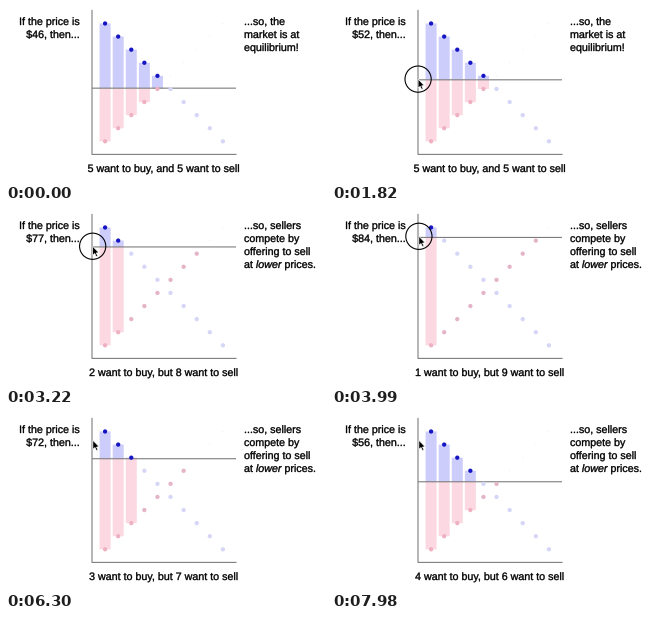
A matplotlib script that plays this animation: 320x176 px, repeating every 8 s.

```python
import matplotlib.pyplot as plt
import numpy as np
from matplotlib.animation import FuncAnimation
from matplotlib.patches import Circle, Polygon, Rectangle
from matplotlib.patheffects import Stroke

W, H, DPI = 320, 176, 100
PX = 72 / DPI                       # points per pixel
LOOP, TICK, STEP = 8000, 20, 70     # ms

plt.rcParams.update({
    "font.family": "Liberation Sans",
    "font.size": 10.7 * PX,
    "text.hinting": "none",
    "path.snap": False,
    "mathtext.fontset": "custom",
    "mathtext.rm": "Liberation Sans",
    "mathtext.it": "Liberation Sans:italic",
})

# Plot box: price 0 to 100 maps onto LEFT/BOTTOM plus SIZE pixels
LEFT, BOTTOM, SIZE, N = 86, 148.4, 144, 10
GAP = SIZE / (N + 1)
BAR = 11
rank = np.arange(1, N + 1)
xs = LEFT + GAP * rank
sell_value = 100 * rank / (N + 1)
buy_value = 100 - sell_value

BLUE, FAINT_BLUE, BLUE_BAR = "#1515c4", "#d6d6f6", "#cdcdfc"
PINK, LOOSE_PINK, PINK_BAR = "#efb0c2", "#e4b4c8", "#fbd8e2"
GHOST, LINE = "#ececec", "#7c7c7c"

BALANCED = ["...so, the", "market is at", "equilibrium!", ""]
SURPLUS = ["...so, sellers", "compete by", "offering to sell",
           r"at $\it{lower}$ prices."]
ARROW = np.array([(0, 0), (0, 9), (2.1, 7.2), (3.6, 10.4), (5, 9.7),
                  (3.6, 6.7), (6.3, 6.5)])


def price_y(price):
    return BOTTOM - SIZE * price / 100


def ease_out(t, start, end):
    u = np.clip((t - start) / (end - start), 0, 1)
    return 1 - (1 - u) ** 2


def drag_price(t):
    return np.interp(t, [1540, 2310, 3220, 3780], [47, 60.2, 77.4, 84.7])


def price_at(t):
    if t < 1400:
        return 46
    if t < 3990:
        return drag_price(t)
    if t < 5180:
        return 84
    # falls one dollar on two of every three steps
    turns, rest = divmod(t - 5180, 3 * STEP)
    return 83 - 2 * turns - (rest >= STEP)


def cursor_at(t):
    enter, rest, grab = np.array([(297, 120), (140, 97), (86, 81.7)])
    if t < 560:
        return enter + (rest - enter) * ease_out(t, STEP, 350)
    if t < 1610:
        return rest + (grab - rest) * ease_out(t, 490, 1190)
    y = price_y(drag_price(t)) - 0.7 if t < 3990 else 26.3
    return np.array([np.interp(t, [1610, 3780], [86, 86.9]), y])


fig = plt.figure(figsize=(W / DPI, H / DPI), dpi=DPI, facecolor="white")
ax = fig.add_axes([0, 0, 1, 1])
ax.set_xlim(0, W)
ax.set_ylim(H, 0)
ax.axis("off")


def bars(color):
    return [ax.add_patch(Rectangle((x - BAR / 2, 0), BAR, 0, color=color,
                                   lw=0, zorder=1)) for x in xs]


def dots(values):
    return ax.scatter(xs, price_y(values), s=(4.3 * PX) ** 2, lw=0, zorder=3)


def label(x, y, align):
    return ax.text(x, y, "", ha=align, va="baseline", color="black",
                   parse_math=align == "left",
                   path_effects=[Stroke(linewidth=0.35 * PX)])


buy_bars, sell_bars = bars(BLUE_BAR), bars(PINK_BAR)
sell_dots, buy_dots = dots(sell_value), dots(buy_value)
ax.plot([LEFT, LEFT, LEFT + SIZE], [BOTTOM - SIZE, BOTTOM, BOTTOM],
        color=LINE, lw=1.1 * PX, zorder=2)
price_line, = ax.plot([], [], color=LINE, lw=1.1 * PX, zorder=2.5,
                      solid_capstyle="butt")

top_left = [label(74, y, "right") for y in (19, 32)]
top_right = [label(238, 19 + 13 * i, "left") for i in range(4)]
summary = label(158, 166, "center")
top_left[0].set_text("If the price is")

ring = ax.add_patch(Circle((0, 0), 13, fill=False, ec="black",
                           lw=1.1 * PX, zorder=5))
cursor = ax.add_patch(Polygon(ARROW, fc="black", ec="white",
                              lw=0.6 * PX, zorder=6))


def set_bar(bar, y0, y1, shown):
    bar.set_visible(bool(shown))
    bar.set_y(y0)
    bar.set_height(y1 - y0)


def draw_market(price):
    y = price_y(price)
    buying, selling = buy_value >= price, sell_value <= price
    buyers, sellers = buying.sum(), selling.sum()
    trading = buying & selling

    for i in range(N):
        set_bar(buy_bars[i], price_y(buy_value[i]), y, trading[i])
        set_bar(sell_bars[i], y, price_y(sell_value[i]), trading[i])
    buy_dots.set_facecolor([BLUE if b else FAINT_BLUE for b in buying])
    sell_dots.set_facecolor([PINK if d else LOOSE_PINK if s else GHOST
                             for d, s in zip(trading, selling)])
    sell_dots.set_sizes(np.where(selling, (4.3 * PX) ** 2, PX ** 2))
    price_line.set_data([LEFT, LEFT + SIZE], [y, y])

    even = buyers == sellers
    top_left[1].set_text(f"${price:.0f}, then...")
    for text, words in zip(top_right, BALANCED if even else SURPLUS):
        text.set_text(words)
    link = "and" if even else "but"
    summary.set_text(f"{buyers} want to buy, {link} {sellers} want to sell")


def update(frame):
    t = (frame * TICK + TICK // 2) // STEP * STEP
    draw_market(price_at(t))
    tip = cursor_at(t)
    cursor.set_visible(t >= STEP)
    cursor.set_xy(tip + ARROW)
    ring.set_visible(1190 <= t < 5040)
    ring.set_center(tip)
    ring.set_radius(np.interp(t, [1190, 1330], [14.6, 13.1]))
    return []


anim = FuncAnimation(fig, update, frames=LOOP // TICK, interval=TICK,
                     init_func=lambda: update(0), repeat=True,
                     repeat_delay=0, blit=False)
plt.show()
```
